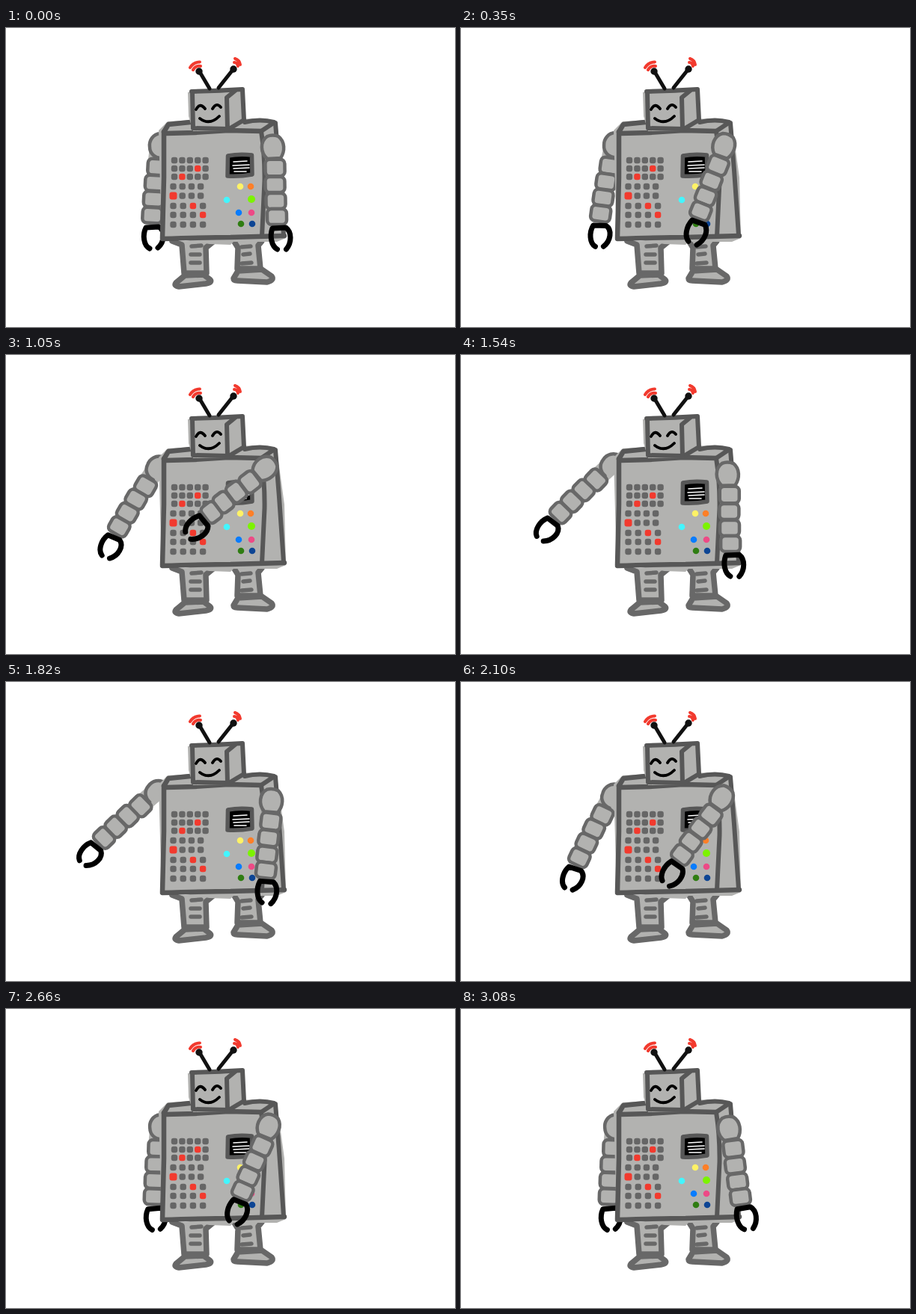
An HTML page that plays this animation: 600 by 400 pixels, repeating every 3.15 s.

```html
<!DOCTYPE html>
<html lang="en">
<head>
<meta charset="utf-8">
<title>Robot</title>
<style>
  html, body { margin: 0; width: 100%; height: 100%; overflow: hidden; background: #fff; }
  svg { display: block; width: 100vw; height: 100vh; }
  path, rect { stroke-linecap: round; stroke-linejoin: round; }
</style>
</head>
<body>
<svg id="stage" viewBox="0 0 600 400"></svg>
<script>
const LOOP = 3150, STEP = 70;
const FILL = '#b2b2b0', DARK = '#575757', MID = '#686868', RED = '#f23a2e';
const stage = document.getElementById('stage');

function add(parent, tag, attrs) {
  const el = document.createElementNS('http://www.w3.org/2000/svg', tag);
  for (const key in attrs) el.setAttribute(key, attrs[key]);
  parent.appendChild(el);
  return el;
}
const group = () => add(stage, 'g', {});
const stroke = (parent, d, color, width, fill = 'none') =>
  add(parent, 'path', { d, stroke: color, 'stroke-width': width, fill });
const shape = (parent, d, fill) => add(parent, 'path', { d, fill });
const dot = (parent, cx, cy, r, fill) => add(parent, 'circle', { cx, cy, r, fill });

function segment(parent, cx, cy, width, height, tilt) {
  add(parent, 'rect', {
    x: cx - width / 2, y: cy - height / 2, width, height, rx: 6,
    fill: FILL, stroke: MID, 'stroke-width': 4.5,
    transform: `rotate(${tilt} ${cx} ${cy})`
  });
}

function drawLeftArm(g) {
  stroke(g, 'M205 155L201 190L195 250', FILL, 25);
  stroke(g, 'M206 141C196 142 191 151 192 159C192 168 199 174 208 174', MID, 4.5, FILL);
  [[202.5, 186], [199, 207.5], [197, 229], [195.5, 250.5]]
    .forEach(([x, y], i) => segment(g, x, y, 26, i ? 21 : 22, 3));
  stroke(g, 'M192 295C184 291 182 277 187 267L204 266C213 271 212 286 203 294', '#000', 7);
}

function drawRightArm(g) {
  stroke(g, 'M357 158L361 250', FILL, 23);
  stroke(g, 'M349 145C339 152 340 167 349 175L367 174C373 165 373 152 364 145Q356 142 349 145Z', MID, 4.5, FILL);
  [[359.5, 187], [359.5, 209.5], [360.5, 231.5], [362, 252.5]]
    .forEach(([x, y], i) => segment(g, x, y, 26, i ? 21 : 22.5, -1));
  stroke(g, 'M362.5 296C355 292 352 279 356 268L374 267C382 273 382 287 374.5 296', '#000', 7);
}

function drawLegs(g) {
  stroke(g, 'M222 285L235 290L238 328L268 328L267 294L278 285', MID, 7.5, FILL);
  stroke(g, 'M239 331L227 341Q224 345 231 346L267 342Q277 340 272 336L264 330Z', MID, 7.5, FILL);
  stroke(g, 'M305 286L310 294L309 322L340 322L337 291L342 285', MID, 7.5, FILL);
  stroke(g, 'M310 325L304 335Q304 338 309 338L349 340Q359 337 355 332L342 323Z', MID, 7.5, FILL);
  stroke(g, 'M248 292L261 291M247 303L259 303M247 314L259 314M315 293L327 292M317 303L326 302M315 315L328 314', MID, 5.5);
}

function drawBody(g) {
  shape(g, 'M204 137L216 125L250 123L342 121L362 127L372 200L374 281L362 286L304 286L300 290L272 289L240 284L208 283Z', FILL);
  stroke(g, 'M211 139L211 200L209 281M209 282Q275 280 300 280L372 278', DARK, 6.5);
  stroke(g, 'M341 138Q346 170 345.5 205L342 279', DARK, 6);
  stroke(g, 'M360 127L365 190L371 277', DARK, 6);
  stroke(g, 'M211 139L217 129L246 126M214 141L252 140L297 137L341 138', DARK, 6.5);
  stroke(g, 'M319 126Q340 121 358 126M341 138L356 128', DARK, 6);
}

function drawPanel(g) {
  const red = new Set(['1,3', '2,1', '4,0', '5,2', '6,3']);
  [177, 188, 199, 212, 224.5, 238, 250, 263].forEach((y, row) => {
    const wide = row > 2;
    for (let col = 0; col < (wide ? 4 : 5); col++) {
      const x = wide ? 223.5 + col * (row > 4 ? 13.2 : 12.2) : 225 + col * 10.4;
      const lit = red.has(row + ',' + col);
      const size = row === 4 && lit ? 10 : 8.4;
      add(g, 'rect', {
        x: x - size / 2, y: y - size / 2, width: size, height: size, rx: 3,
        fill: lit ? RED : '#666'
      });
    }
  });
  stroke(g, 'M296.5 171Q312 168 328.5 170L329 196Q312 199 296 198Z', DARK, 5.5, '#000');
  stroke(g, 'M304 179L322 178M303 184L325 183M304 188L325 187M305 192L321 192', '#fff', 1.6);
  [
    [313, 212, '#fff266'], [327, 212, '#ff7f27'], [295, 230, '#43f6ff'], [328, 229, '#7cf300'],
    [311, 247, '#087cff'], [328, 247, '#ed4a86'], [314, 262, '#2f7d12'], [329, 262, '#0d4594']
  ].forEach(([x, y, color]) => dot(g, x, y, color === '#7cf300' ? 5 : 4.3, color));
}

function drawHead(g) {
  shape(g, 'M243 86L318 82L319 124L298 137L250 138L244 118Z', FILL);
  stroke(g, 'M248 85Q285 84 316 82L318 123L298 135', DARK, 6);
  stroke(g, 'M249 87L250 134L296 135L295 93L306 84', DARK, 6);
  stroke(g, 'M272 81L259 59M284 80L303 56', '#111', 5);
  dot(g, 258, 58, 4.7, '#111');
  dot(g, 304, 55, 4.7, '#111');
  stroke(g, 'M246 53Q250 46 259 45.5M250 56Q253 50 260 51', RED, 4);
  stroke(g, 'M306 41Q312 43 313 49M305 46Q309 46 310 51', RED, 4);
  stroke(g, 'M254 109Q259 99 266 108M276 108Q281 99 287 106M259 121Q272 131 285 118', '#000', 3.8);
}

// Arm swings as [time, degrees]; both loop.
const leftSwing = [[0, 0], [560, 8.6], [1050, 26.7], [1120, 29.5], [1540, 40.9], [1750, 43.2],
  [1820, 42.7], [2240, 8.6], [2310, 3.2], [2520, -1.3], [3080, -1.3], [LOOP, 0]];
const rightSwing = [[0, 0], [630, 37.6], [1050, 53.8], [1540, 1], [1610, -0.9], [1680, 0],
  [1820, 7.8], [2310, 51.9], [2800, 12.1], [3080, -6.1], [LOOP, 0]];

// Smooth curve through the keys that never overshoots them.
function swingAt(keys, time) {
  const n = keys.length - 1;
  const rate = i => {
    const [a, b] = [keys[(i + n) % n], keys[(i + n) % n + 1]];
    return (b[1] - a[1]) / (b[0] - a[0]);
  };
  const slope = i => {
    const a = rate(i - 1), b = rate(i);
    return a * b > 0 ? 2 * a * b / (a + b) : 0;
  };
  let i = 0;
  while (time >= keys[i + 1][0]) i++;
  const [t0, v0] = keys[i], [t1, v1] = keys[i + 1];
  const span = t1 - t0, u = (time - t0) / span, w = 1 - u;
  return v0 * w * w * (1 + 2 * u) + v1 * u * u * (3 - 2 * u)
    + span * u * w * (slope(i) * w - slope(i + 1) * u);
}

const leftArm = group(), torso = group(), rightArm = group();
drawLeftArm(leftArm);
drawLegs(torso);
drawBody(torso);
drawPanel(torso);
drawHead(torso);
drawRightArm(rightArm);

function render(now) {
  const time = Math.floor(now % LOOP / STEP) * STEP;
  leftArm.setAttribute('transform', `rotate(${swingAt(leftSwing, time)} 217 147)`);
  rightArm.setAttribute('transform', `rotate(${swingAt(rightSwing, time)} 359.6 145.4)`);
}

const start = performance.now();
function tick() {
  render(performance.now() - start);
  requestAnimationFrame(tick);
}
tick();
</script>
</body>
</html>
```
